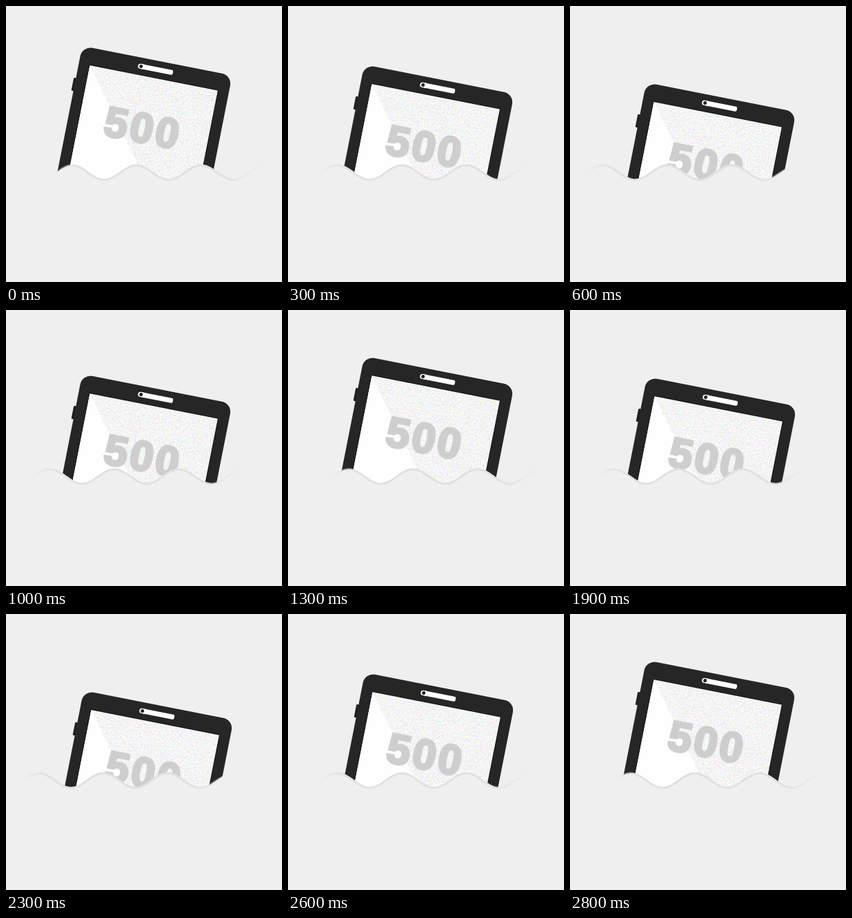
Animation of 400x400 px, one loop 2.9 s. Source, as an HTML page:

```html
<!DOCTYPE html>
<html lang="en">
<head>
<meta charset="utf-8">
<title>500</title>
<style>
  html, body { margin: 0; width: 100%; height: 100%; overflow: hidden; background: #efefef; }
  svg { display: block; width: 100vw; height: 100vh; }
  text { font: bold 61px "Liberation Sans", Arial, sans-serif; letter-spacing: 3.6px; }
</style>
</head>
<body>
<svg viewBox="0 0 400 400">
  <defs>
    <filter id="static" x="0" y="0" width="1" height="1" color-interpolation-filters="sRGB">
      <feTurbulence type="fractalNoise" baseFrequency=".73" numOctaves="2" seed="5"/>
      <feColorMatrix values=".55 0 0 0 .685  0 .55 0 0 .685  0 0 .55 0 .685  0 0 0 0 1"/>
    </filter>
    <linearGradient id="fade" gradientUnits="userSpaceOnUse" x1="70" y1="0" x2="372" y2="0">
      <stop offset="0" stop-color="#e1e1e1" stop-opacity="0"/>
      <stop offset=".12" stop-color="#e1e1e1"/>
      <stop offset=".82" stop-color="#e1e1e1"/>
      <stop offset="1" stop-color="#e1e1e1" stop-opacity="0"/>
    </linearGradient>
  </defs>
  <rect width="400" height="400" fill="#efefef"/>
  <g id="tablet">
    <g transform="rotate(11.15)">
      <rect x="-19.3" y="22" width="6" height="19" rx="1" fill="#1f1f1f"/>
      <rect x="-16.2" y="-25.5" width="221.4" height="230" rx="15" fill="#262626"/>
      <rect x="-.8" y="-.8" width="190.6" height="200" fill="#060606"/>
      <rect width="189" height="198" fill="#f5f5f5" filter="url(#static)"/>
      <path d="M0 0V198H149Z" fill="#fefefe"/>
      <rect x="68.6" y="-16.4" width="12" height="7.1" rx="3.55" fill="#fff"/>
      <rect x="72" y="-16.4" width="48.2" height="7.1" rx="2.2" fill="#fff"/>
      <circle cx="73.1" cy="-12.8" r="2.5" fill="#222"/>
      <text x="37" y="95.3" fill="#cfcecf" stroke="#cfcecf" stroke-width="3.6">500</text>
    </g>
  </g>
  <g id="wave">
    <path id="water" fill="#efefef"/>
    <path id="crest" fill="none" stroke="url(#fade)" stroke-width="3"/>
  </g>
</svg>
<script>
  const el = id => document.getElementById(id);
  const FRAME = 100, COUNT = 29;
  const HALF = 14, LOW = 22; // second dive: start and deepest step

  const waveY = x => 241.4 - 10.5 * Math.cos(2 * Math.PI * (x - 189) / 93.5);

  function curve(from, to) {
    let d = "";
    for (let x = from; x <= to; x += 2) d += (d ? "L" : "M") + x + " " + waveY(x).toFixed(2);
    return d;
  }

  el("water").setAttribute("d", curve(-20, 464) + "V400H-20Z");
  el("crest").setAttribute("d", curve(70, 372));

  // Depth from 0 to 1: two dives, the second one step longer, optionally held at its start
  function dive(n, hold = 0) {
    if (n < HALF) return 1 - Math.abs(n - 7) / 7;
    if (n < LOW) return Math.max(0, (n - HALF - hold) / (LOW - HALF - hold));
    return (COUNT - n) / (COUNT - LOW);
  }

  function move(id, x, y) {
    el(id).setAttribute("transform", `translate(${x} ${y})`);
  }

  function draw(ms) {
    const n = Math.floor(ms / FRAME) % COUNT;
    const drift = n < HALF ? 0 : Math.round(2 * dive(n));
    move("tablet", 121.5 + drift, 86 + Math.round(62 * dive(n)));
    move("wave", Math.round(-56 * dive(n, 1)), 0);
  }

  const start = performance.now();
  function tick() {
    draw(performance.now() - start);
    requestAnimationFrame(tick);
  }
  tick();
</script>
</body>
</html>
```
